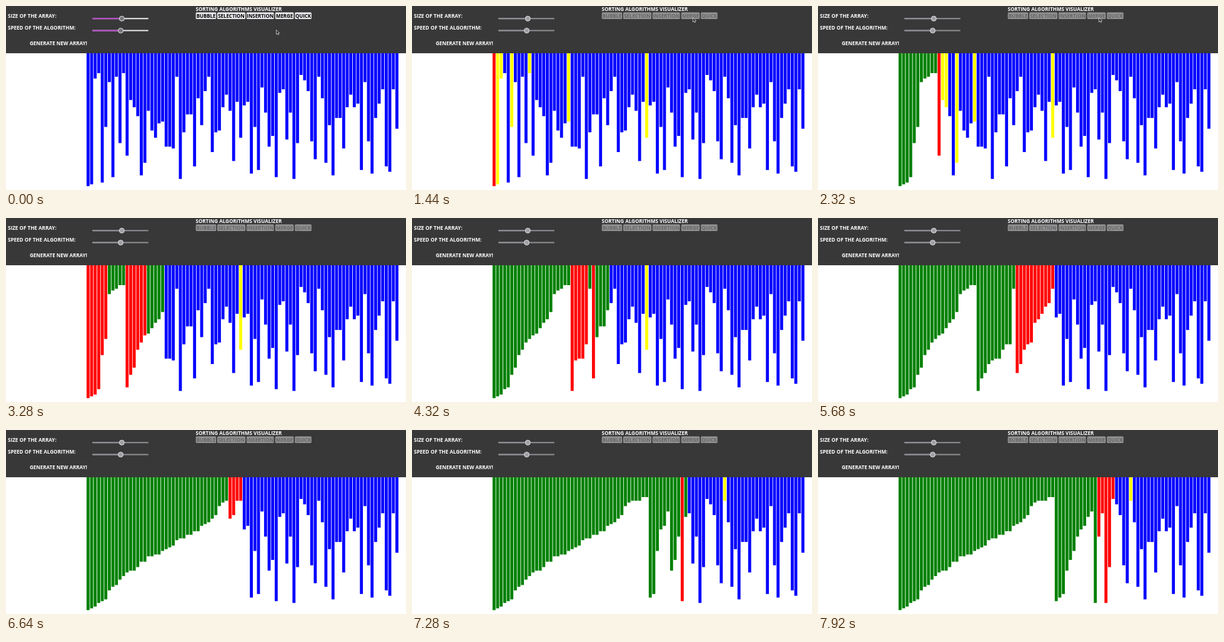
Write an HTML page that moves like this. It is 640x296 px and loops after 8 s.

```html
<!DOCTYPE html>
<html lang="en">
<head>
<meta charset="utf-8">
<title>Sorting Algorithms Visualizer</title>
<style>
  html, body { margin: 0; width: 100%; height: 100%; overflow: hidden; background: #fff; }
  svg { display: block; width: 100vw; height: 100vh; }
  text { font: 700 8px "Open Sans", "Noto Sans", sans-serif; fill: #fff; }
  .label { font-size: 8.1px; }
  .track { fill: #e9e9ed; }
  .fill { fill: #b23fc4; }
  .thumb { fill: #77777c; stroke: #e4e4e8; stroke-width: 1; }
  .button rect { fill: #e9e9ed; }
  .button text { fill: #000; font-size: 7.9px; text-anchor: middle; }
  .button.hover rect { fill: #d0d0d7; }
  .busy .button rect { fill: #919193; }
  .busy .button text { fill: #666; }
  .busy .track, .busy .fill { fill: #8f8f96; }
  .busy .thumb { fill: #a0a0a4; }
</style>
</head>
<body>
<svg id="stage" viewBox="0 0 640 296">
  <g id="bars"></g>
  <rect width="640" height="76" fill="#383838"/>
  <text class="label" x="3" y="19">SIZE OF THE ARRAY:</text>
  <text class="label" x="3" y="38.3">SPEED OF THE ALGORITHM:</text>
  <text x="38" y="63">GENERATE NEW ARRAY!</text>
  <text x="303.5" y="8">SORTING ALGORITHMS VISUALIZER</text>
  <g id="controls"></g>
  <path id="cursor" d="M0 0V7L1.7 5.5L2.8 8L4 7.5L3 5.1H5.1Z" fill="#222" stroke="#eee" stroke-width=".7"/>
</svg>
<script>
const LOOP = 8000, STEP = 80, CLICK = 1280;
const START = [
  63, 62, 3, 0, 61, 30, 5, 58, 2, 39, 0, 46, 15, 19, 24, 57, 50, 21, 32, 36, 28, 27,
  41, 41, 42, 2, 59, 33, 23, 23, 52, 14, 29, 10, 2, 44, 33, 32, 19, 12, 21, 49, 16, 36,
  18, 16, 56, 30, 54, 8, 22, 41, 35, 58, 11, 9, 37, 22, 59, 39, 1, 4, 10, 38, 48, 2,
  14, 50, 29, 57, 25, 25, 42, 19, 12, 19, 17, 54, 5, 38, 56, 25, 17, 9, 52, 55, 9, 31
];
// [time, value...] points, joined by straight lines
const PACE = [[1360, 0], [2320, 96], [3280, 191], [4320, 296], [5680, 432], [6640, 528], [7920, 655]];
const POINTER = [
  [160, 432.5, 38.5], [320, 438, 28], [480, 443, 20], [560, 444.5, 18.3], [1040, 444.5, 18.3],
  [1120, 449.5, 18.7], [2880, 449.5, 18.7], [2960, 450, 21.5], [3040, 487, 80], [3120, 526, 180], [3200, 560, 310]
];

const $ = id => document.getElementById(id);

function add(parent, tag, attrs, text = "") {
  const el = document.createElementNS("http://www.w3.org/2000/svg", tag);
  for (const key in attrs) el.setAttribute(key, attrs[key]);
  el.textContent = text;
  return parent.appendChild(el);
}

function along(points, t) {
  let i = 1;
  while (i < points.length - 1 && t > points[i][0]) i++;
  const a = points[i - 1], b = points[i];
  const f = Math.min(1, Math.max(0, (t - a[0]) / (b[0] - a[0])));
  return a.slice(1).map((v, k) => v + (b[k + 1] - v) * f);
}

function slider(x, y) {
  add($("controls"), "rect", { class: "track", x: 138, y: y - 1, width: 90, height: 2, rx: 1 });
  add($("controls"), "rect", { class: "fill", x: 138, y: y - 1, width: x - 138, height: 2, rx: 1 });
  add($("controls"), "circle", { class: "thumb", cx: x, cy: y, r: 4 });
}

function button(label, x, width) {
  const g = add($("controls"), "g", { class: "button" });
  add(g, "rect", { x, y: 10.3, width, height: 10.6, rx: 1.5 });
  add(g, "text", { x: x + width / 2, y: 18.6 }, label);
  return g;
}

// Records every visible update of a descending merge sort
function record(values) {
  const sizes = [...values], ops = [];
  const mark = (i, color) => ops.push([i, sizes[i], color]);
  function merge(start, mid, end) {
    const out = [];
    let p = start, q = mid + 1;
    while (p <= mid || q <= end) {
      if (q > end) {
        out.push(sizes[p++]);
        mark(end, "red");
      } else {
        const i = p <= mid && sizes[p] > sizes[q] ? p++ : q++;
        out.push(sizes[i]);
        mark(i, "red");
      }
    }
    out.forEach((v, k) => {
      sizes[start + k] = v;
      mark(start + k, "green");
    });
  }
  function sort(start, end) {
    if (start >= end) return;
    const mid = (start + end) >> 1;
    mark(mid, "yellow");
    sort(start, mid);
    sort(mid + 1, end);
    merge(start, mid, end);
  }
  sort(0, sizes.length - 1);
  return ops;
}

slider(185.3, 20.3);
slider(183.5, 39.6);
button("BUBBLE", 303.7, 32.6);
button("SELECTION", 338, 45);
button("INSERTION", 384.8, 43.9);
const mergeButton = button("MERGE", 430.8, 29.5);
button("QUICK", 462.2, 26.6);

const ops = record(START);
const bars = START.map((v, i) =>
  add($("bars"), "rect", { x: 128.9 + 5.68 * i, y: 70, width: 4.8 }));

function draw(now) {
  const t = Math.floor(now % LOOP / STEP) * STEP;
  const state = START.map(v => [v, "blue"]);
  const done = Math.floor(along(PACE, t)[0] + 0.001);
  for (const [i, size, color] of ops.slice(0, done)) state[i] = [size, color];
  bars.forEach((bar, i) => {
    bar.setAttribute("height", 38 + 2.885 * state[i][0]);
    bar.setAttribute("fill", state[i][1]);
  });
  $("stage").classList.toggle("busy", t >= CLICK);
  mergeButton.classList.toggle("hover", t >= 480);
  $("cursor").setAttribute("transform", `translate(${along(POINTER, t)})`);
}

const begin = performance.now();
function tick() {
  draw(performance.now() - begin);
  requestAnimationFrame(tick);
}
tick();
</script>
</body>
</html>
```
